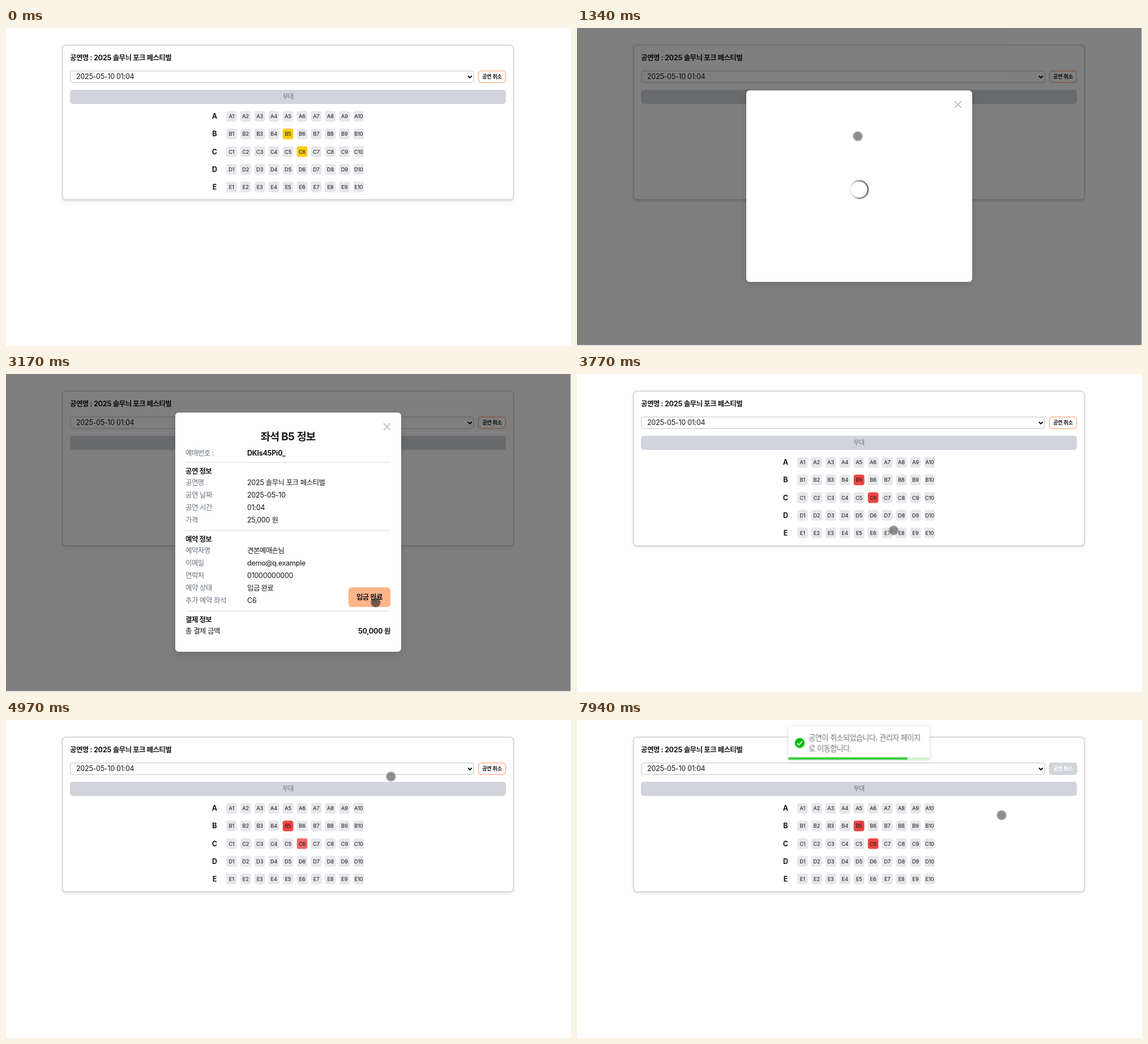
An HTML page for the animation above (8 s loop, 998 by 561 pixels).

```html
<!DOCTYPE html>
<html lang="ko">
<head>
<meta charset="utf-8">
<title>좌석 관리</title>
<style>
html, body { margin: 0; width: 100%; height: 100%; overflow: hidden; background: #fefefe; }
svg { display: block; width: 998px; height: 561px; }
text { font: 400 12.5px Inter, "Noto Sans CJK KR", "Noto Sans CJK", sans-serif; letter-spacing: -.02em; fill: #18181b; white-space: pre; }
.ko { letter-spacing: -.05em; }
.b { font-weight: 700; }
.mid { text-anchor: middle; }
.end { text-anchor: end; }
.card { fill: #fff; stroke: #d1d1db; stroke-width: 1.5; filter: drop-shadow(0 2px 2px rgba(0,0,0,.13)); }
.box { fill: #fff; stroke: #d1d5db; stroke-width: 1.5; }
.modal { fill: #fefefe; filter: drop-shadow(0 4px 6px rgba(0,0,0,.12)); }
.close { fill: none; stroke: #b5b5b5; stroke-width: 1.6; stroke-linecap: round; }
.rule { stroke: #e5e5e8; stroke-width: 1.5; }
.label { fill: #6b7280; }
.outline { fill: #fff; stroke: #ffb48a; stroke-width: 1.5; }
.toast rect:first-child { fill: #fff; filter: drop-shadow(0 1px 4px rgba(0,0,0,.14)); }

/* one loop is 8 s, so 1% is 80 ms */
.step { animation: 8s step-end infinite; }
.shade { animation-name: shade; }
.loading { animation-name: loading; }
.spinner { animation-name: spinner; }
.infoB { animation-name: infoB; }
.infoC { animation-name: infoC; }
.waiting { animation-name: waiting; }
.paid { animation-name: paid; }
.payHover { animation-name: payHover; }
.cancelHover { animation-name: cancelHover; }
.cancelOff { animation-name: cancelOff; }
.ring { transform-origin: 498.5px 285px; animation: turn 1s -.66s linear infinite; }
.seatB5 { animation: seatB5 8s linear infinite; }
.seatC6 { animation: seatC6 8s linear infinite; }
.ask { transform-origin: 860px 39px; animation: ask 8s ease infinite; }
.done { transform-origin: 498px 40.5px; animation: done 8s ease infinite; }
.bar { transform-origin: 373px 0; animation: bar 8s linear infinite; }
.pointer { animation: pointer 8s ease-in-out infinite; }
.seen { animation-name: seen; }
.dot { stroke-width: 2; animation-name: press; }

@keyframes shade { 0%, 43%, 60.375% { opacity: 0 } 16.75%, 53.75% { opacity: 1 } }
@keyframes loading { 0%, 17.5%, 54.625% { opacity: 0 } 16.75%, 53.75% { opacity: 1 } }
@keyframes spinner { 0%, 17.5%, 38.75%, 54.625% { opacity: 0 } 16.75%, 34.625%, 53.75% { opacity: 1 } }
@keyframes infoB { 0%, 43% { opacity: 0 } 17.5% { opacity: 1 } }
@keyframes infoC { 0%, 60.375% { opacity: 0 } 54.625% { opacity: 1 } }
@keyframes waiting { 0% { opacity: 1 } 38.75%, 100% { opacity: 0 } }
@keyframes paid { 0% { opacity: 0 } 38.75%, 100% { opacity: 1 } }
@keyframes payHover { 0%, 43% { opacity: 0 } 33% { opacity: 1 } }
@keyframes cancelHover { 0%, 72.375% { opacity: 0 } 69.25% { opacity: 1 } }
@keyframes cancelOff { 0% { opacity: 0 } 72.375%, 100% { opacity: 1 } }
@keyframes turn { to { transform: rotate(360deg) } }
@keyframes seatB5 { 0%, 42.99% { fill: #facc15 } 43% { fill: #e5e7eb } 45%, 100% { fill: #ef4444 } }
@keyframes seatC6 { 0%, 42.99% { fill: #facc15 } 43% { fill: #e5e7eb } 45%, 60.37% { fill: #ef4444 } 60.375% { fill: #eda6a6 } 63.25%, 100% { fill: #ef4444 } }
@keyframes ask {
  0%, 72.375% { opacity: 0; transform: scale(.3) }
  76.75% { opacity: 1 }
  81.125% { transform: scale(1) }
  91.5% { opacity: 1; transform: scale(1) }
  95.875%, 100% { opacity: 0; transform: scale(.3) }
}
@keyframes done {
  0%, 91.44% { opacity: 0; transform: scale(.3) }
  95.81% { opacity: 1 }
  100% { opacity: 1; transform: scale(1) }
}
@keyframes bar { 0%, 91.44% { transform: scaleX(1) } 100% { transform: scaleX(.829) } }
@keyframes seen { 0% { opacity: 0 } 2.375%, 100% { opacity: 1 } }
@keyframes press {
  0%, 43.75%, 82% { fill: rgba(80,80,80,.65); stroke: rgba(170,170,170,.8) }
  34.625%, 72.375% { fill: rgba(40,40,40,.66); stroke: rgba(90,90,90,.4) }
}
@keyframes pointer {
  0%, 2.375% { transform: translate(982px, 552px) }
  11.75% { transform: translate(506px, 197px) }
  15%, 24.25% { transform: translate(496px, 191px) }
  25.1% { transform: translate(500px, 184px) }
  31.25% { transform: translate(665px, 428px) }
  33.75%, 43% { transform: translate(653px, 403px) }
  49.6%, 57.12% { transform: translate(521px, 224px) }
  57.125%, 61.25% { transform: translate(676px, 100px) }
  69.875%, 78.5% { transform: translate(862px, 89px); animation-timing-function: ease-in }
  80.25% { transform: translate(872px, 80px); animation-timing-function: linear }
  82% { transform: translate(895px, 58px); animation-timing-function: ease-out }
  88%, 92.5% { transform: translate(944px, 24px) }
  99.25%, 100% { transform: translate(750px, 168px) }
}
</style>
</head>
<body>
<svg id="stage" viewBox="0 0 998 561"></svg>
<script>
const SHOW = '2025 솔무늬 포크 페스티벌';

const rect = (x, y, w, h, r, attrs) =>
  `<rect x="${x}" y="${y}" width="${w}" height="${h}" rx="${r}" ${attrs}/>`;

// y is the baseline; Hangul runs get tighter tracking
const text = (x, y, str, cls = '', size = 12.5, color = '') =>
  `<text x="${x}" y="${y}" class="${cls}" style="font-size:${size}px;${color && 'fill:' + color}">` +
  str.replace(/[가-힣]+/g, '<tspan class="ko">$&</tspan>') + '</text>';

const group = (cls, ...parts) => `<g class="${cls}">${parts.join('')}</g>`;

function seats() {
  return [...'ABCDE'].map((row, j) => {
    const y = 155.8 + 31.15 * j;
    const cells = Array.from({ length: 10 }, (_, i) => {
      const x = 398.3 + 24.95 * i, id = row + (i + 1);
      return rect(x - 9.4, y - 9.4, 18.8, 18.8, 4, `fill="#e5e7eb" class="seat${id}"`) +
        text(x, y + 3.4, id, 'mid', 9.4);
    });
    return text(368.3, y + 4.4, row, 'b mid') + cells.join('');
  }).join('');
}

function page() {
  return rect(99.75, 30.25, 796.5, 272.5, 6, 'class="card"') +
    text(113, 56.8, '공연명 : ' + SHOW, 'b') +
    rect(113.75, 75.75, 712.5, 20.5, 4, 'class="box"') +
    text(124, 90.4, '2025-05-10 01:04') +
    '<path d="M816 84.5l3.4 3.4 3.4-3.4" fill="none" stroke="#000" stroke-width="1.8"/>' +
    rect(834.5, 75.75, 48, 20.5, 5, 'class="outline"') +
    rect(834.5, 75.75, 48, 20.5, 5, 'fill="#ffb48a" class="step cancelHover"') +
    text(858.3, 89.2, '공연 취소', 'b mid', 9.4) +
    group('step cancelOff',
      rect(833.75, 75, 49.5, 22, 5, 'fill="#d1d5db"'),
      text(858.3, 89.2, '공연 취소', 'b mid', 9.4, '#fff')) +
    rect(113, 109, 770, 25, 5, 'fill="#d1d5db"') +
    text(498, 125.2, '무대', 'mid', 10.9, '#64707c') +
    seats();
}

const panel = (y, h) => rect(299, y, 399, h, 6, 'class="modal"') +
  `<path class="close" d="M667.5 ${y + 19.5}l11 11m0-11l-11 11"/>`;

function info(cls, seat, other, status, hover) {
  const rows = [
    [192, '공연명', SHOW], [214, '공연 날짜', '2025-05-10'], [236, '공연 시간', '01:04'],
    [257.5, '가격', '25,000 원'], [312, '예약자명', '견본예매손님'], [334, '이메일', 'demo@q.example'],
    [355.7, '연락처', '01000000000'], [377.5, '예약 상태', '입금 '], [399.3, '추가 예약 좌석', other]
  ];
  return group('step ' + cls,
    panel(68, 422),
    text(498, 117.3, `좌석 ${seat} 정보`, 'b mid', 18.7),
    text(317, 143.5, '예매번호 :', 'label'),
    text(426, 143.5, 'DKIs45Pi0_', 'b'),
    ...[156, 276, 418].map(y => `<path class="rule" d="M317 ${y}H679"/>`),
    ...[[172, '공연 정보'], [292, '예약 정보'], [433.5, '결제 정보']].map(([y, s]) => text(317, y + 4.4, s, 'b')),
    ...rows.map(([y, name, value]) => text(317, y + 4.4, name, 'label') + text(426, y + 4.4, value)),
    status,
    text(317, 458.4, '총 결제 금액'),
    text(679, 458.4, '50,000 원', 'b end'),
    rect(605.75, 377.25, 72.5, 33, 5, 'class="outline"'),
    hover,
    text(642, 397.6, '입금 완료', 'b mid'));
}

function modals() {
  const state = (s, cls) => text(450.5, 381.9, s, cls);
  return rect(0, 0, 997.3, 559.5, 0, 'fill="rgba(0,0,0,.5)" class="step shade"') +
    group('step loading', panel(110, 338)) +
    info('infoB', 'B5', 'C6', state('대기', 'step waiting') + state('완료', 'step paid'),
      rect(605, 376.5, 74, 34.5, 5, 'fill="#ffb48a" class="step payHover"')) +
    info('infoC', 'C6', 'B5', state('완료', ''), '') +
    group('step spinner',
      '<circle class="ring" cx="498.5" cy="285" r="15.5" fill="none" stroke="url(#fade)" stroke-width="3"/>');
}

function toasts() {
  return group('toast ask',
      rect(735, 11.5, 250, 55.5, 3, ''),
      text(748, 35.8, '공연 취소', 'b', 11.3, '#333'),
      text(748, 51.3, '공연을 취소하시겠습니까?', '', 11.3, '#757575'),
      '<path d="M921.5 11.5V63M922 39.3H985" stroke="#dedede"/>',
      text(953.5, 30, '네', 'mid', 12.8, '#666'),
      text(953.5, 58, '아니오', 'mid', 13, '#c8453b'),
      rect(735, 63.2, 250, 3.8, 1, 'fill="url(#rainbow)" opacity=".7"')) +
    group('toast done',
      rect(373, 11, 250, 59, 3, ''),
      '<circle cx="393" cy="40.5" r="8.8" fill="#07bc0c"/>',
      '<path d="M388.5 41l3.2 3.2 6-7" fill="none" stroke="#fff" stroke-width="1.7"/>',
      text(409, 36.6, '공연이 취소되었습니다. 관리자 페이지', '', 13.2, '#757575'),
      text(409, 55, '로 이동합니다.', '', 13.2, '#757575'),
      rect(373, 66, 250, 4, 1, 'fill="#07bc0c" opacity=".2"'),
      rect(373, 66, 250, 4, 0, 'fill="#07bc0c" opacity=".75" class="bar"'));
}

function gradient(id, colors) {
  const stops = colors.map((c, i) => `<stop offset="${i / (colors.length - 1)}" stop-color="${c}"/>`);
  return `<linearGradient id="${id}">${stops.join('')}</linearGradient>`;
}

document.getElementById('stage').innerHTML =
  `<defs>${gradient('fade', ['#f4f4f4', '#a0a0a0', '#777'])}` +
  gradient('rainbow', ['#4cd964', '#5ac8fa', '#007aff', '#34aadc', '#5856d6', '#ff2d55']) + '</defs>' +
  page() + modals() + toasts() +
  group('step seen', group('pointer', '<circle class="step dot" r="8"/>'));
</script>
</body>
</html>
```
